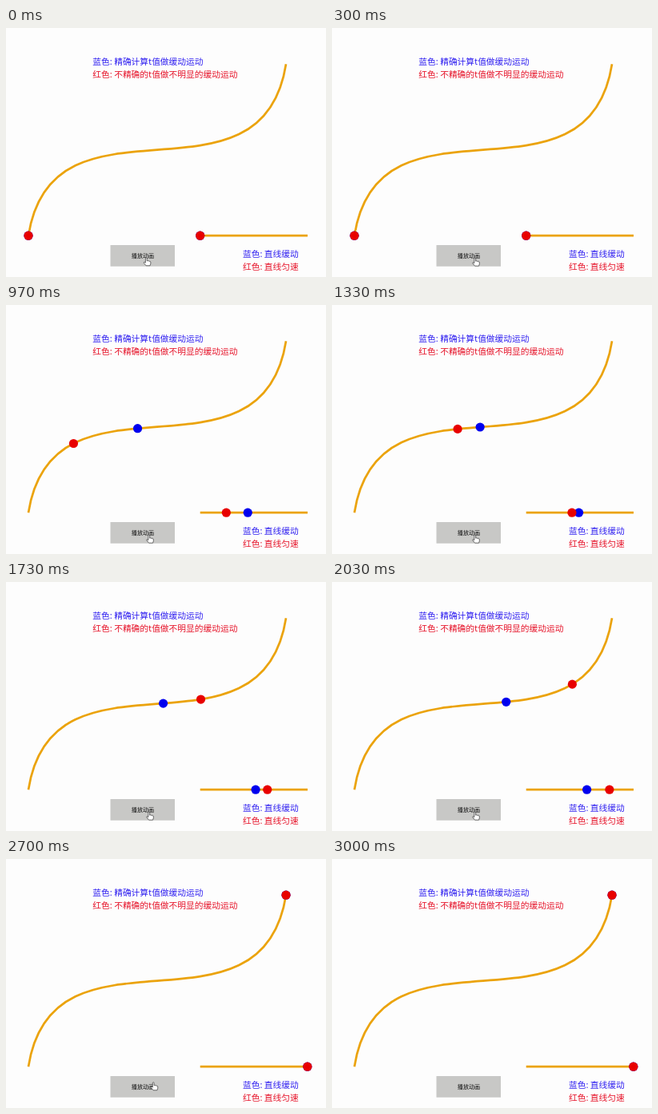
Write an HTML page that moves like this. It is 400 px wide and 312 px high and loops after 4.03 s.

```html
<!DOCTYPE html>
<html lang="zh-CN">
<head>
<meta charset="utf-8">
<title>缓动运动</title>
<style>
  html, body { margin: 0; width: 100%; height: 100%; overflow: hidden; background: #fdfdfd; }
  svg { display: block; width: 400px; height: 312px; }
  text { font: 10.74px "Noto Sans CJK SC", "Noto Sans CJK", "Noto Sans", sans-serif; }
  .label { font-size: 7.1px; fill: #111; text-anchor: middle; }
  .track { fill: none; stroke: #eba30c; stroke-width: 2.7; }
  .blue { fill: #0000ee; }
  .red { fill: #e80000; }
  .blueText { fill: #3020f0; }
  .redText { fill: #e6142a; }
  .cursor { fill: #fff; stroke: #333; stroke-width: .7; stroke-linejoin: round; }
</style>
</head>
<body>
<svg viewBox="0 0 400 312">
  <text class="blueText" x="108.3" y="45.7">蓝色: 精确计算t值做缓动运动</text>
  <text class="redText" x="108.3" y="61.8">红色: 不精确的t值做不明显的缓动运动</text>
  <text class="blueText" x="296" y="287">蓝色: 直线缓动</text>
  <text class="redText" x="296" y="303.3">红色: 直线匀速</text>
  <path class="track" id="curve"/>
  <path class="track" d="M242.7 260.2H377"/>
  <rect x="130.5" y="272" width="80.5" height="26.7" fill="#c8c8c6"/>
  <text class="label" x="171" y="288.4">播放动画</text>
  <circle class="blue" id="blueCurve" r="5.6"/>
  <circle class="blue" id="blueLine" r="5.6"/>
  <circle class="red" id="redCurve" r="5.6"/>
  <circle class="red" id="redLine" r="5.6"/>
  <path class="cursor" id="hand" d="M-.9 .6Q0 -.6 .9 .6V4Q1.9 3.2 2.6 4.2Q3.6 3.6 4.2 4.6Q5.3 4.3 5.5 5.4V7.6L4.7 10H-.2L-3 6.6Q-3.2 5.2 -1.9 5.6L-.9 6.4Z"/>
  <path class="cursor" id="arrow" d="M0 0V9L2.1 7.1L3.5 10.2L4.9 9.6L3.5 6.6H6.4Z"/>
</svg>
<script>
  const LOOP = 4030, START = 480, DURATION = 2000, FPS = 30;
  const xs = [28, 58, 320, 350];
  const ys = [260.2, 67.2, 238.2, 45.2];
  const $ = id => document.getElementById(id);
  const clamp = v => Math.min(1, Math.max(0, v));
  const mix = (a, b, k) => a + (b - a) * k;
  const smooth = k => k * k * (3 - 2 * k);

  function bezier([a, b, c, d], t) {
    const s = 1 - t;
    return s * s * s * a + 3 * s * s * t * b + 3 * s * t * t * c + t * t * t * d;
  }

  // The drawn curve doubles as the easing function.
  function ease(u) {
    if (u <= 0 || u >= 1) return u;
    const x = mix(xs[0], xs[3], u);
    let lo = 0, hi = 1;
    for (let i = 0; i < 30; i++) {
      const mid = (lo + hi) / 2;
      if (bezier(xs, mid) < x) lo = mid; else hi = mid;
    }
    return (bezier(ys, lo) - ys[0]) / (ys[3] - ys[0]);
  }

  function place(dot, x, y) {
    dot.setAttribute("cx", x);
    dot.setAttribute("cy", y);
  }

  function placePair(name, t) {
    place($(name + "Curve"), bezier(xs, t), bezier(ys, t));
    place($(name + "Line"), mix(242.7, 376.8, t), 260.2);
  }

  function placeCursor(ms) {
    const nudge = smooth(clamp((ms - 30) / 270));
    const leave = smooth(clamp((ms - 2670) / 300));
    const x = mix(mix(175.3, 178.8, nudge), 372, leave);
    const y = mix(mix(287.8, 288.2, nudge), -14, leave);
    const onButton = y > 271;
    for (const [id, shown] of [["hand", onButton], ["arrow", !onButton]]) {
      $(id).setAttribute("transform", `translate(${x} ${y})`);
      $(id).style.display = shown ? "" : "none";
    }
  }

  function draw(ms) {
    const step = Math.floor((ms + 5) * FPS / 1000);
    const now = step * 1000 / FPS;
    const u = clamp((now - START) / DURATION);
    placePair("red", u);
    placePair("blue", ease(u));
    placeCursor(now);
  }

  $("curve").setAttribute("d", "M" + xs.map((x, i) => x + " " + ys[i] + (i ? "" : "C")).join(" "));

  const origin = performance.now();
  function tick() {
    draw((performance.now() - origin) % LOOP);
    requestAnimationFrame(tick);
  }
  tick();
</script>
</body>
</html>
```
